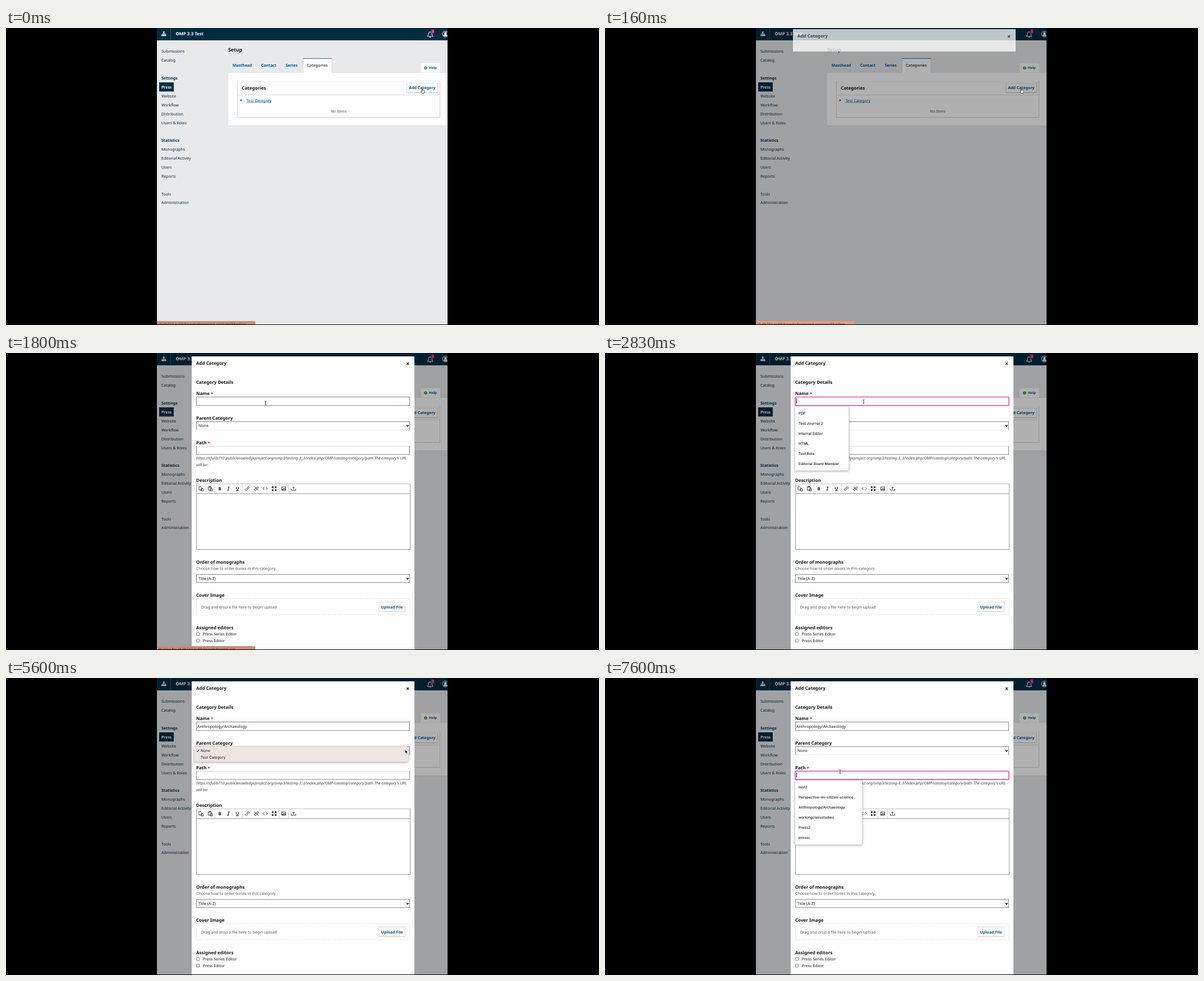
An HTML page with a canvas that plays this animation: 1057x530 px, repeating every 8000 ms.

```html
<!DOCTYPE html>
<html lang="en">
<head>
<meta charset="utf-8">
<title>Add Category</title>
<style>
html, body { margin: 0; width: 100%; height: 100%; overflow: hidden; background: #000; }
canvas { display: block; }
</style>
</head>
<body>
<canvas id="stage" width="1057" height="530"></canvas>
<script>
const c = document.getElementById('stage').getContext('2d');
c.textRendering = 'geometricPrecision';
const LOOP = 8000, INK = '#161616', NAVY = '#002c42', BLUE = '#00538f', PINK = '#d00a6c', GREY = '#858585', PALE = '#dedede', WHITE = '#fefefe';
const NOTO = '"Noto Sans", sans-serif', INTER = 'Inter, sans-serif';
const clamp = v => Math.max(0, Math.min(1, v));
const ramp = (t, a, b) => clamp((t - a) / (b - a));

// y is the middle of the capital letters
function text(s, x, y, size = 7, color = INK, style = '', family = NOTO) {
  c.font = `${style} ${size}px ${family}`;
  c.fillStyle = color;
  c.fillText(s, x, y + size * 0.357);
}
const bold = (s, x, y, size = 8, color = INK) => text(s, x, y, size, color, 'bold');
const small = (s, x, y) => text(s, x, y, 6.45, INK, '500', INTER);

function rect(x, y, r, b, color) {
  c.fillStyle = color;
  c.fillRect(x, y, r - x, b - y);
}
function line(x, y, r, b, color, w = 1) {
  c.strokeStyle = color;
  c.lineWidth = w;
  c.beginPath();
  c.moveTo(x, y);
  c.lineTo(r, b);
  c.stroke();
}
function icon(path, x, y, color = '#333', w = 0.9, fill) {
  const p = new Path2D(path);
  c.save();
  c.translate(x, y);
  c.strokeStyle = color;
  c.lineWidth = w;
  if (fill) { c.fillStyle = fill; c.fill(p); }
  c.stroke(p);
  c.restore();
}
function field(x, y, r, b, top = GREY, bottom = GREY, side = GREY) {
  rect(x, y, r, b, WHITE);
  line(x, y + 0.5, r, y + 0.5, top);
  line(x, b - 0.5, r, b - 0.5, bottom);
  line(x + 0.5, y, x + 0.5, b, side);
  line(r - 0.5, y, r - 0.5, b, side);
}
function rounded(x, y, r, b, radius, fill, stroke, w = 1) {
  c.beginPath();
  c.roundRect(x, y, r - x, b - y, radius);
  if (fill) { c.fillStyle = fill; c.fill(); }
  c.shadowColor = 'transparent';
  if (stroke) { c.strokeStyle = stroke; c.lineWidth = w; c.stroke(); }
}
function floating(x, y, r, b, radius, fill, stroke) {
  c.save();
  c.shadowColor = 'rgba(0,0,0,.35)';
  c.shadowBlur = 4;
  c.shadowOffsetY = 1;
  rounded(x, y, r, b, radius, fill, stroke, 0.6);
  c.restore();
}
const focusRing = (y, b) => rounded(339, y, 720, b, 1.5, null, '#ea49b0', 1.5);

function header() {
  rect(269, 0, 787, 22, NAVY);
  line(293.5, 0, 293.5, 22, '#2d5266');
  icon('M0-2V2M-3 2V0H3V2', 281.5, 10.5, '#fff', 0.9);
  [[280, 6.5], [277.2, 12], [280, 12], [282.9, 12]].forEach(([x, y]) => rect(x, y, x + 2.7, y + 2.3, '#fff'));
  bold('OMP 3.3 Test', 302.5, 10.5, 7.8, '#fff');
  icon('M-5 3.5Q-3 2-3-1Q-3-4.5 0-4.5Q3-4.5 3-1Q3 2 5 3.5ZM-1 5H1', 756, 11.5, '#fff', 1);
  rounded(757.5, 2, 763.8, 10, 2, PINK);
  text('3', 759, 6.2, 5.8, '#fff');
  c.beginPath();
  c.arc(783.3, 10.7, 5.2, 0, 7);
  c.strokeStyle = '#fff';
  c.lineWidth = 1;
  c.stroke();
  icon('M-3.5 4Q-3 1 0 1Q3 1 3.5 4ZM-2-1A2 2 0 1 0 2-1A2 2 0 1 0-2-1Z', 783.3, 10.2, '#fff', 0.4, '#fff');
}

const MENU = ['Submissions', 'Catalog', '', '*Settings', 'Press', 'Website', 'Workflow', 'Distribution', 'Users & Roles', '',
  '*Statistics', 'Monographs', 'Editorial Activity', 'Users', 'Reports', '', 'Tools', 'Administration'];
function page() {
  rect(269, 0, 787, 529, '#e8e9eb');
  header();
  rect(273, 97, 299, 113.3, NAVY);
  MENU.forEach((s, i) => {
    const y = 42 + 15.88 * i;
    if (s[0] === '*') bold(s.slice(1), 277, y, 7, NAVY);
    else if (s === 'Press') bold(s, 277, y, 6.9, '#fff');
    else text(s, 277, y, 7, NAVY);
  });
  bold('Setup', 396, 38.5, 8.7);
  rect(396, 79.5, 787, 174.5, WHITE);
  line(396, 79.5, 787, 79.5, PALE, 0.7);
  line(396, 174.5, 787, 174.5, '#d4d5d7', 0.8);
  rect(529.5, 54, 581, 81, WHITE);
  line(529.5, 54.5, 581, 54.5, '#1677b0');
  line(529.5, 55, 529.5, 80, '#d0d0d0', 0.7);
  line(581, 55, 581, 80, '#d0d0d0', 0.7);
  [['Masthead', 403.7], ['Contact', 454.7], ['Series', 498.7]].forEach(([s, x]) => bold(s, x, 67, 7, BLUE));
  bold('Categories', 536, 67, 7, '#555');
  rect(739.5, 63, 773.5, 79.5, WHITE);
  c.beginPath();
  c.arc(748, 71.2, 2.8, 0, 7);
  c.fillStyle = '#29962d';
  c.fill();
  rect(747.5, 69.7, 748.5, 72.6, '#fff');
  bold('Help', 753.8, 71.2, 6.2, BLUE);

  field(412, 95, 774, 160, '#f4f4f4', '#cfcfcf', '#d6d6d6');
  line(413, 119.5, 773, 119.5, PALE);
  bold('Categories', 420.3, 107, 8);
  field(714, 98, 770, 116, '#e4e4e4', '#bbb', '#d5d5d5');
  bold('Add Category', 718.3, 107, 7, BLUE);
  icon('M0-2L3 0L0 2Z', 418, 129, BLUE, 0.1, BLUE);
  text('Test Category', 428.4, 129.2, 7, BLUE);
  line(428.4, 132.8, 473.5, 132.8, BLUE, 0.6);
  text('No Items', 579, 148.7, 7, '#555', 'italic');
}

function select(y, value, bottom) {
  field(339, y, 720, y + 15.5, GREY, bottom);
  text(value, 343, y + 7.7);
  icon('M-2-1L0 1.2L2-1', 715.8, y + 7.8, '#111', 1.3);
}

function toolbar() {
  field(339, 233, 721, 351, '#c4c4c4', '#999', '#999');
  line(339, 250.8, 721, 250.8, '#aaa', 1.2);
  [372.5, 421, 486.5, 503.5].forEach(x => line(x, 234, x, 250, '#ccc', 0.8));
  const y = 242;
  icon('M-4-3.5H-1L1-1.5V2.5H-4ZM0 0H3L4 1V4H0V0', 348, y);
  icon('M-3.5-3H2V3H-3.5ZM-2-4H.5V-2.5H-2ZM0 0H4V4H0Z', 364, y, '#333', 0.9, '#fff');
  bold('B', 378.5, y, 7.6);
  icon('M-1.5 3H1.5M0 3L1.2-3M-.4-3H2.7', 396, y, '#222', 1.1);
  icon('M-2-3V0Q-2 2 0 2Q2 2 2 0V-3M-2.6 3.6H2.6', 412.5, y, '#222', 1);
  const link = 'M-1 1L1.5-1.5M-1-1L1-3Q2.5-4 3.3-2.8Q4-1.5 3-.7L1.5 1M1 1.2L-1 3Q-2.5 4-3.3 2.8Q-4 1.5-3 .7L-1.5-.8';
  icon(link, 430, y);
  icon(link + 'M-3.5-3.5L3.5 3.5', 446.5, y);
  icon('M-1.5-2.5L-4 0L-1.5 2.5M1.5-2.5L4 0L1.5 2.5', 462, y);
  icon('M-3.5-1V-3.5H-1M1-3.5H3.5V-1M3.5 1V3.5H1M-1 3.5H-3.5V1M-3-3L-1-1M3-3L1-1M-3 3L-1 1M3 3L1 1', 478, y, '#222', 1.1);
  icon('M-3.5-3H3.5V3H-3.5ZM-3 2L-1 0L0 1L1.5-1L3 2ZM-2-1.5H-1', 495, y);
  icon('M-4 0V3H4V0M0 1.5V-3M-2-1L0-3L2-1', 512.5, y);
}

function form(t) {
  const ready = t >= 730, down = ready ? 48 : 0, low = ready ? 45.5 : 0;
  bold('Category Details', 339, 52);
  bold('Name', 339, 72.3);
  bold('*', 365, 73, 8, PINK);
  field(339, 78, 720, 94.2);
  if (t >= 3160) text('Anthropology/Archaeology', 341, 86.2);
  bold('Parent Category', 339, 116);
  select(122, 'None', '#ececec');
  bold('Path', 339, 160);
  bold('*', 359.5, 160.7, 8, PINK);
  field(339, 166, 720, 181.5, '#d8d8d8');
  text("https://sfulib710.publicknowledgeproject.org/omp3/testing-3_3/index.php/OMP/catalog/category/path The category's URL",
    339, 187.7, 6.95, '#444', 'italic');
  text('will be:', 339, 199.3, 6.95, '#444', 'italic');
  bold('Description', 339, 227.3);
  if (ready) toolbar();
  else {
    field(339, 233, 720, 303, GREY, '#d0d0d0');
    icon('M0 4L4 0M2.3 4L4 2.3', 715, 298, '#777', 0.6);
  }
  bold('Order of monographs', 339, 324.7 + down);
  text('Choose how to order books in this category.', 339, 336.7 + down, 6.95, '#555');
  select(346.7 + down, 'Title (A-Z)', ready ? GREY : '#ececec');
  bold('Cover Image', 339, 384.4 + down);
  if (ready) {
    c.setLineDash([2, 2]);
    c.strokeStyle = '#ddd';
    c.lineWidth = 1;
    c.strokeRect(339.5, 438.5, 380, 28.5);
    c.setLineDash([]);
    text('Drag and drop a file here to begin upload', 347.8, 453.2, 6.95, '#555');
    field(664, 444, 712, 462, PALE, '#ccc', PALE);
    bold('Upload File', 668.5, 453.2, 7, BLUE);
  } else {
    field(339, 390, 720, 407, '#eee', '#ddd', '#999');
    rect(339, 390.3, 343, 406.7, '#bd0080');
  }
  bold('Assigned editors', 339, 444.7 + low);
  ['Press Series Editor', 'Press Editor'].forEach((s, i) => {
    const y = 456.5 + low + i * 11.8;
    rounded(339.5, y - 3.2, 345, y + 2.3, 0.8, '#fff', '#666', 0.8);
    text(s, 350.7, y);
  });
  if (!ready) {
    rect(339, 506.5, 428, 529, '#e7e7ea');
    line(339.5, 506.5, 339.5, 529, NAVY);
    text('* Denotes required field', 347, 518.3, 6.8, INK, '500 italic');
  }
}

function suggestions(y, width, list) {
  floating(338.6, y, 338.6 + width, y + 115, 1, WHITE, '#c4c4c4');
  list.forEach((s, i) => small(s, 345, y + 12.7 + 17.9 * i));
}

function overlays(t) {
  const caret = (x, y) => line(x, y, x, y + 9, '#111');
  if (t >= 2030 && t < 4730) {
    focusRing(78.5, 93.8);
    if (t < 3160) {
      if (t < 2330 || t >= 2830) caret(341.6, 81);
      if (t >= 2130) {
        c.globalAlpha = ramp(t, 2100, 2200);
        suggestions(95, 96, ['PDF', 'Test Journal 2', 'Internal Editor', 'HTML', 'Test Role', 'Editorial Board Member']);
        c.globalAlpha = 1;
      }
    } else if (t < 3660 || t >= 4160 && t < 4660) line(430.6, 82, 430.6, 90, '#aaa', 0.8);
  }
  if (t >= 4730 && t < 5830) {
    c.globalAlpha = 1 - ramp(t, 5640, 5830);
    floating(335, 122, 717.5, 149.7, 4, '#eee5e3', '#d5cbc9');
    icon('M-2 0L-.6 2L2-2.3', 342, 130, '#111', 1);
    text('None', 347, 130, 6.65, INK, '', INTER);
    text('Test Category', 347, 141.4, 6.65, INK, '', INTER);
    c.globalAlpha = 1;
  }
  if (t >= 6600) {
    focusRing(166.3, 181.2);
    if (t < 7100 || t >= 7600) caret(341.6, 168.5);
    suggestions(182.4, 120, ['test2', 'Perspective-on-citizen-science', 'Anthropology/Archaeology', 'workingclassstudies', 'Press2', 'pressc']);
  }
}

function modal(t) {
  const p = ramp(t, 60, 260), loaded = t >= 430;
  c.save();
  c.globalAlpha = 1 - (1 - p) ** 2;
  c.translate(loaded ? 0 : 4, -8 * (1 - p));
  rect(331, 6, 728, loaded ? 529 : 46, WHITE);
  bold('Add Category', 339, 18.3);
  icon('M-2-2L2 2M2-2L-2 2', 716, 19, '#111', 1.3);
  if (loaded) { form(t); overlays(t); }
  c.restore();
}

function status(t) {
  if (t >= 1860) return;
  rounded(268, 523, 444.5, 534, 2, t > 60 && t < 430 ? '#e29a82' : '#c98d79');
  text(t < 300 ? 'sfulib710.publicknowledgeproject.org/omp3/testing' : 'Waiting for sfulib710.publicknowledgeproj.org',
    271.5, 528.4, t < 300 ? 6.4 : 6.3, '#3a211a');
}

// pointer stops: time, x, y
const STOPS = [[0, 743, 112], [880, 743, 112], [960, 720, 108], [1429, 720, 108], [1430, 463, 90], [1790, 463, 90], [1860, 461, 87],
  [3660, 461, 87], [3900, 462, 118], [4030, 462, 118], [4200, 682.5, 133], [4380, 700, 134], [4560, 711.5, 127.5],
  [5830, 711.5, 127.5], [6230, 417, 162], [6459, 417, 162], [6460, 419, 167], [LOOP, 419, 167]];
function pointer(t) {
  const i = STOPS.findIndex(s => s[0] > t), [t0, x0, y0] = STOPS[i - 1], [t1, x1, y1] = STOPS[i];
  const k = ramp(t, t0, t1), x = x0 + (x1 - x0) * k, y = y0 + (y1 - y0) * k;
  if (t < 930) {
    icon('M-1.5 0V-3.5Q-1-4.6-.4-3.5V-1.2Q3-1.2 3.3.5Q3.3 3 2 4.5H-1.3L-3.3 1.5Q-3 .2-1.5 1.2Z', x, y, '#222', 0.8, '#fff');
  } else if (t >= 1430 && t < 3740 || t >= 6460) {
    icon('M-1.5-3.5Q0-3.5 0-2.5Q0-3.5 1.5-3.5M0-2.5V2.5M-1.5 3.5Q0 3.5 0 2.5Q0 3.5 1.5 3.5', x, y, '#222', 0.8);
  } else {
    icon('M0 0V7.3L1.6 5.8L2.8 8.5L4 8L2.9 5.4H5Z', x, y, '#fff', 0.7, '#111');
  }
}

function frame(now) {
  const t = now % LOOP;
  rect(0, 0, 1057, 530, '#000');
  c.save();
  c.beginPath();
  c.rect(269, 0, 518, 529);
  c.clip();
  page();
  rect(269, 0, 787, 529, `rgba(0,0,0,${0.31 * ramp(t, 10, 130)})`);
  if (t >= 60) modal(t);
  status(t);
  pointer(t);
  c.restore();
  requestAnimationFrame(frame);
}
requestAnimationFrame(frame);
</script>
</body>
</html>
```
